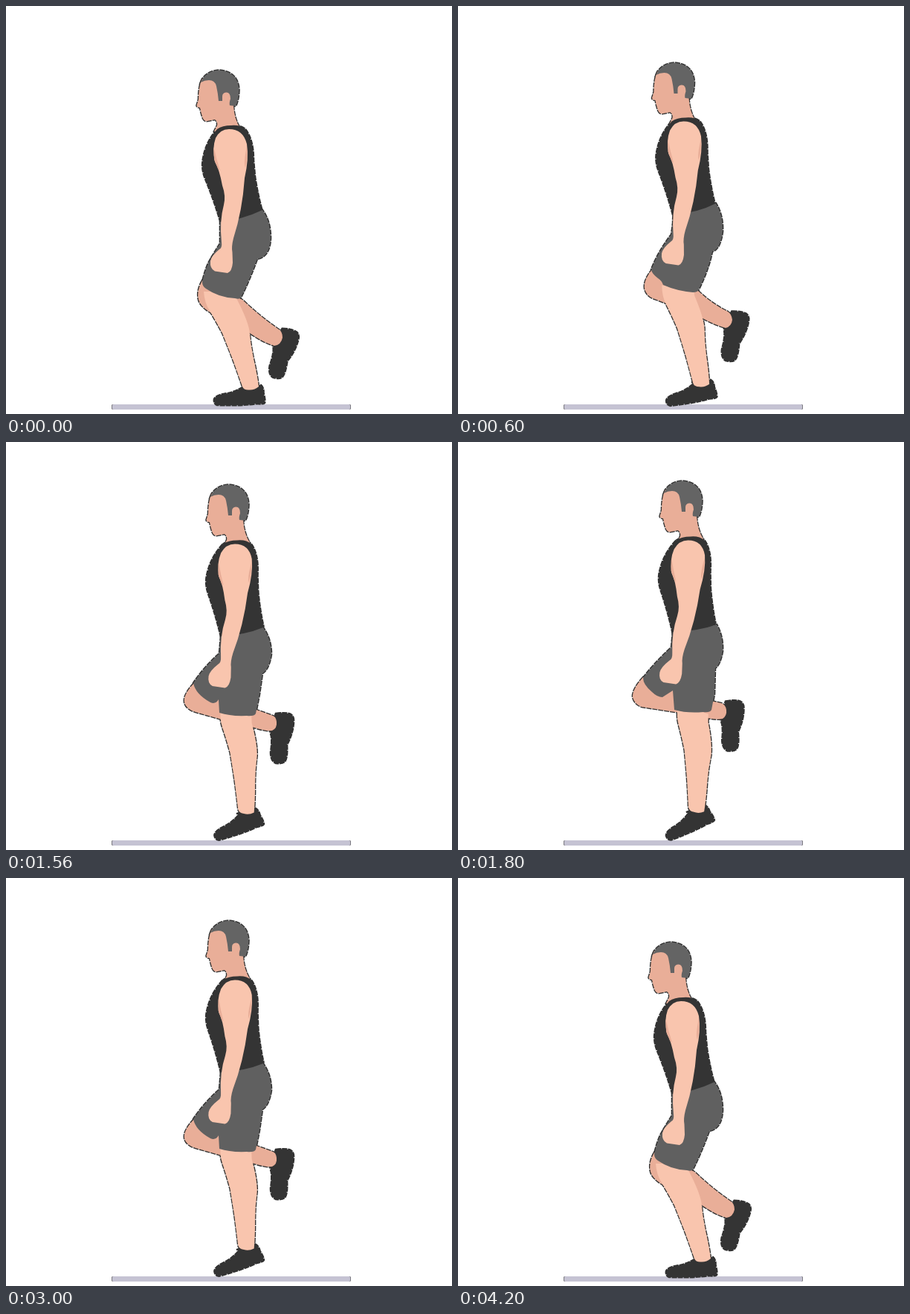
Recreate the animation shown at these times as an HTML page with a canvas. Size 600 px wide and 550 px high, loop 4800 ms.

```html
<!DOCTYPE html>
<html lang="en">
<head>
<meta charset="utf-8">
<title>Single-leg calf raise</title>
<style>
html, body { margin: 0; width: 100%; height: 100%; overflow: hidden; background: #fff; }
canvas { display: block; }
</style>
</head>
<body>
<canvas id="stage" width="600" height="550"></canvas>
<script>
const ctx = document.getElementById('stage').getContext('2d');
const STEP = 600, STEPS = 8;
const SKIN = '#f9c5ae', SHADE = '#e9ae98', HAIR = '#646464', DARK = '#343434', SHORTS = '#606060';
const FLOOR = '#c5c3d3', EDGE = '#303030';

const path = d => new Path2D(d);

// Rigid parts, drawn in the lowest pose
const face = path('M264 98Q259 108 259 126L256.500 134Q257 137 261 137L262 142L264 149Q266 156 271 155L281 153Q285 156 284 161L280 169L303 176L315 165Q307 152 306 134L304 100Z');
const hair = path('M262 103Q268 88 286 86.500Q312 88 313.500 113Q313 127 309 135L301 134Q300 131 302 125Q302 116 296 116.500Q291 117 291 122V128L286 128Q285 117 283 108Q281 100 273 100Q267 100 262 103Z');
const torso = path('M284 166Q291 161 303 161Q315 160 322 166Q333 180 333 208L335 230Q339 256 345 277L340 285L289 293Q280 262 268 233Q263 220 264.500 209Q268 184 284 166Z');
const arm = path('M300 166Q319 166 324 186Q327 206 321 232Q318 276 306 313Q303 325 304.500 332L305 346Q304 358 298 360L281 357.500Q274 354 275 344Q276 337 287 328Q291 326 290 318Q287 290 293 268Q296 256 291 242Q287 220 281 210Q277 192 282 178Q288 166 300 166Z');
const armShade = path('M279.500 190Q283 206 288 222L285 219L280 207ZM324 190Q325 207 322 218Q319 212 324 190Z');
const shin = path('M266 385L308 385L311 396Q325 423 327.500 438Q329 456 333 475Q338 497 340 513Q334 518 327 517.500Q320 518 318 513Q306 477 291 441Q282 424 274 411Q267 400 266 385Z');
const shoe = path('M318 511L343 511Q347 514 346.500 522Q349 530 348 535Q346 537 337 536Q320 539 284 538Q279 536 280 530Q282 525 293 523Q307 521 318 514Z');
const liftedShoe = path('M363 366Q376 364 383 367Q388 370 387 378Q386 393 378 408Q379 426 375 431Q371 434 363 433Q356 430 356 418Q358 407 357 397L355 388Z');

// head: offset; lean: shear and offset of the upper body; toe, shin, lift: offset and degrees
const poses = [
  {
    head: [0, 0, 0], lean: [0, 0, 0], toe: [0, 0, 0], shin: [0, 0, 0], lift: [8, 71, 11],
    calf: 'M264 370Q256 384 259 396Q261 404 273 412L328 441Q347 454 361 458Q370 457 372 447Q372 439 367 436Q342 419 318 396Z',
    shorts: 'M288 291Q318 288 345 275Q356 290 356 313Q355 338 338 341Q327 371 316 393Q314 396 308 394Q286 393 269 381Q264 378 264 372Q269 350 277 338L288 320Z'
  },
  {
    head: [4.5, -10, 0], lean: [-.025, -1, -10.5], toe: [1, 1, -8], shin: [-2, -4, 4.5], lift: [5, 47, 7],
    calf: 'M262 354Q249 370 251 381Q253 390 262 394L278 400L329 421Q346 430 360 434Q368 432 369 423Q368 415 363 412Q342 402 323 384Z',
    shorts: 'M291 281Q322 279 347 266Q357 282 356 304Q353 328 342 331Q338 353 324 382Q323 386 316 386Q294 384 276 376Q274 370 269 367Q260 360 260 355Q270 330 287 308Z'
  },
  {
    head: [13, -29, 0], lean: [-.058, -2.5, -28.5], toe: [2, -1, -17], shin: [-6.5, -16, 12.5], lift: [0, 0, 0],
    calf: 'M253 325Q238 341 240 351Q242 360 255 364L290 374L334 385Q349 390 358 389Q365 386 364 377Q363 370 359 369L334 360Z',
    shorts: 'M289 262Q322 260 346 250Q357 266 357 286Q354 306 345 312L341 340L336 366Q334 370 324 369Q302 370 287 365L286 347Q282 354 275 351Q255 340 252 325Q266 304 287 285Z'
  },
  {
    head: [15, -34, 0], lean: [-.074, -3.7, -33.5], toe: [2, -1, -22], shin: [-9, -18, 16.5], lift: [-3, -17, -2.5],
    calf: 'M249 317Q234 334 235 344Q237 353 247 357L292 364L335 372Q349 375 356 373Q362 369 361 361Q360 354 354 352L340 349Z',
    shorts: 'M289 256Q324 255 348 246Q357 262 356 282Q353 300 346 305L345 340L341 361Q339 365 330 364Q308 366 291 361L289 335L275 344Q268 344 261 337Q249 327 249 318Q264 298 287 277Z'
  }
];

const move = (px, py) => ([dx, dy, deg]) => {
  ctx.translate(px + dx, py + dy);
  ctx.rotate(deg * Math.PI / 180);
  ctx.translate(-px, -py);
};
const lean = ([k, dx, dy]) => ctx.transform(1, 0, k, 1, dx - k * 345, dy);

for (const p of poses) {
  const shift = move(0, 0);
  p.parts = [
    [liftedShoe, DARK, move(375, 368), p.lift],
    [path(p.calf), SHADE],
    [shoe, DARK, move(283, 536), p.toe],
    [shin, SKIN, move(329, 515), p.shin],
    [face, SHADE, shift, p.head],
    [hair, HAIR, shift, p.head],
    [torso, DARK, lean, p.lean],
    [path(p.shorts), SHORTS],
    [arm, SKIN, lean, p.lean],
    [armShade, SHADE, lean, p.lean]
  ];
}

function drawParts(parts, outline) {
  for (const [shape, color, place, amount] of parts) {
    ctx.save();
    if (place) place(amount);
    ctx.fillStyle = color;
    if (outline) ctx.stroke(shape);
    else ctx.fill(shape);
    ctx.restore();
  }
}

function bar(x, width, color) {
  ctx.fillStyle = color;
  ctx.beginPath();
  ctx.roundRect(x, 537, width, 7, 2);
  ctx.fill();
}

function draw() {
  const step = Math.floor(performance.now() / STEP) % STEPS;
  const { parts } = poses[Math.min(step, STEPS - 1 - step)];
  ctx.fillStyle = '#fff';
  ctx.fillRect(0, 0, 600, 550);
  bar(142, 322, EDGE);
  bar(142.5, 321, FLOOR);
  ctx.strokeStyle = EDGE;
  ctx.lineWidth = 2.6;
  ctx.setLineDash([7, 1]);
  drawParts(parts, true);
  drawParts(parts, false);
  requestAnimationFrame(draw);
}
draw();
</script>
</body>
</html>
```
